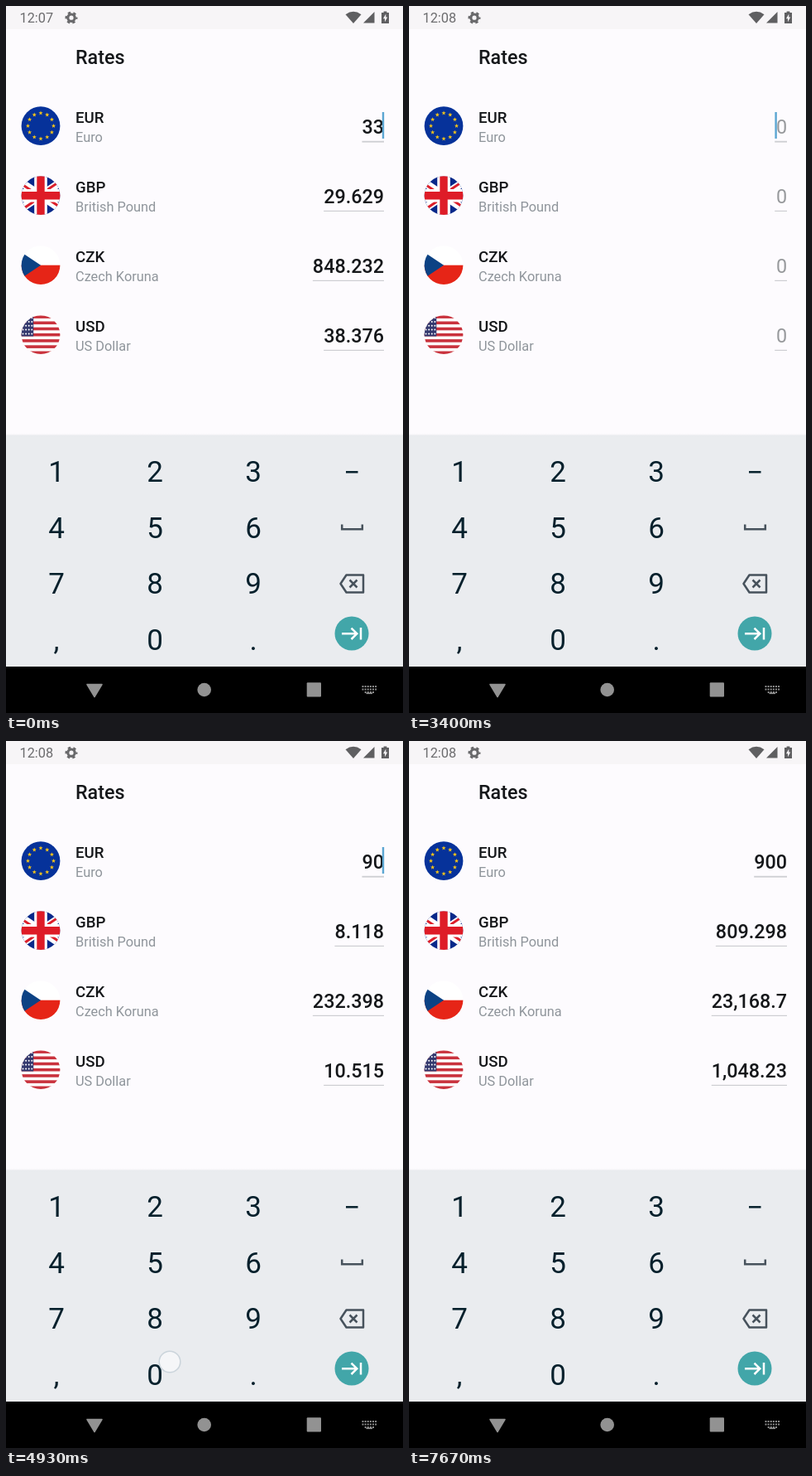
These frames come from a looping animation (480x853 px, 8 s). An HTML page:

```html
<!DOCTYPE html>
<html lang="en">
<head>
<meta charset="utf-8">
<title>Rates</title>
<style>
  html, body { margin: 0; width: 100%; height: 100%; overflow: hidden; background: #fdfbfe; }
  svg { display: block; width: 100vw; height: 100vh; font-family: Roboto, sans-serif; }
  .title { font-size: 23.35px; font-weight: 500; fill: #15171a; }
  .code { font-size: 18.68px; font-weight: 500; fill: #15171a; }
  .name { font-size: 16.34px; fill: #8f959b; }
  .value { font-size: 23.35px; font-weight: 500; fill: #15171a; text-anchor: end; }
  .value.hint { fill: #97999c; font-weight: 400; }
  .key { font-size: 35px; fill: #06202c; text-anchor: middle; }
</style>
</head>
<body>
<svg viewBox="0 0 480 853" preserveAspectRatio="none">
  <defs>
    <clipPath id="disc"><circle r="23.4"/></clipPath>
    <linearGradient id="shade" x2="0" y2="1">
      <stop stop-color="#fdfbfe"/><stop offset="1" stop-color="#e6e8eb"/>
    </linearGradient>
  </defs>
  <rect width="480" height="853" fill="#fdfbfe"/>

  <!-- status bar -->
  <rect width="480" height="28" fill="#f7f5f7"/>
  <text id="clock" x="16.500" y="20.300" font-size="16.340" fill="#6c6c6e"></text>
  <g transform="translate(79 14.200)" fill="none" stroke="#69696b">
    <circle r="4.200" stroke-width="3.200"/>
    <circle r="6.300" stroke-width="2.400" stroke-dasharray="3.300" stroke-dashoffset="1.650"/>
  </g>
  <g fill="#5f5f61">
    <path d="M410.500 10.200Q420 3.400 429.500 10.200L420 21Z"/>
    <path d="M445.500 7V20.500H432Z"/>
    <path d="M456.600 8V6.500H460.400V8H463V21H454V8Z"/>
  </g>
  <path d="M459.300 9.500L456 15.300H458V19.300L461.200 13.500H459.300Z" fill="#f7f5f7"/>

  <text class="title" x="84" y="70.200">Rates</text>
  <g id="rows"></g>
  <rect id="cursor" y="128" width="2.400" height="32" fill="#5ba6d2"/>

  <!-- keyboard -->
  <rect y="516" width="480" height="3" fill="url(#shade)"/>
  <rect y="518.500" width="480" height="279" fill="#eaecef"/>
  <rect id="press" width="118" height="66" fill="#d9dce0"/>
  <g id="keys"></g>
  <g fill="none" stroke="#47525c" stroke-width="2.500">
    <path d="M411 562.300H425.500" stroke="#06202c"/>
    <path d="M406.200 625.500V631.300H430.800V625.500"/>
    <path d="M411.500 686.500H432V707.500H411.500L404.500 697Z" stroke-linejoin="round"/>
    <path d="M415.500 692.500L424.500 701.500M424.500 692.500L415.500 701.500"/>
  </g>
  <circle cx="418" cy="757" r="20.500" fill="#42a6a9"/>
  <path d="M406 757.300H424M417.500 750.600L424.300 757.300L417.500 764M429 750V764.600" fill="none" stroke="#fff" stroke-width="2.500"/>
  <circle id="touch" r="12.800" fill="#f8f9fb" fill-opacity=".75" stroke="#cbd4db" stroke-width="1.600"/>

  <!-- navigation bar -->
  <rect y="797" width="480" height="56" fill="#000"/>
  <g fill="#929292">
    <path d="M98 818.500H116L107 833.500Z" stroke="#929292" stroke-width="1.500" stroke-linejoin="round"/>
    <circle cx="239.700" cy="825" r="8.300"/>
    <rect x="363.700" y="816.300" width="17.300" height="17.300" rx="1"/>
  </g>
  <path d="M430.500 821H448M430.500 824.500H448M433.700 828H446" stroke="#929292" stroke-width="1.900" stroke-dasharray="1.900 1.230"/>
  <path d="M435.500 829.300H443" stroke="#929292" stroke-width="1.600"/>
</svg>
<script>
const $ = id => document.getElementById(id);
const range = (n, f) => Array.from({ length: n }, (_, i) => f(i)).join('');
const rect = (x, y, w, h, fill) => `<rect x="${x}" y="${y}" width="${w}" height="${h}" fill="${fill}"/>`;
const path = (d, color, width) => `<path d="${d}" stroke="${color}" stroke-width="${width}" fill="none"/>`;

function star(x, y, r) {
  const pts = [...Array(10).keys()].map(i => {
    const a = i * Math.PI / 5, d = i % 2 ? r * 0.42 : r;
    return `${x + d * Math.sin(a)},${y - d * Math.cos(a)}`;
  });
  return `<polygon points="${pts.join(' ')}" fill="#f6c518"/>`;
}

// Flags are centred on 0,0 and clipped to a disc
const flags = [
  rect(-24, -24, 48, 48, '#06329a') +
    range(12, i => star(15.5 * Math.sin(i * Math.PI / 6), -15.5 * Math.cos(i * Math.PI / 6), 2.7)),
  rect(-24, -24, 48, 48, '#08288a') +
    path('M-35 -23.4L35 23.4M-35 23.4L35 -23.4', '#fff', 9.4) +
    path('M-35 -21.8L0 1.6M35 21.8L0 -1.6M-35 25L0 1.6M35 -25L0 -1.6', '#dc1f2b', 3) +
    path('M0 -24V24M-24 0H24', '#fff', 15.6) +
    path('M0 -24V24M-24 0H24', '#de1c27', 9.4),
  rect(-24, -24, 48, 24, '#fff') + rect(-24, 0, 48, 24, '#e62517') +
    '<path d="M-35 -23.4L0 0L-35 23.4Z" fill="#0c4284"/>',
  rect(-24, -24, 48, 48, '#fff') +
    range(7, i => rect(-24, -23.4 + i * 7.2, 48, 3.6, '#c9323d')) +
    rect(-24, -23.4, 15.2, 25.2, '#34396f') +
    range(20, i => `<circle cx="${-21.5 + i % 4 * 3.6}" cy="${-20.5 + (i >> 2) * 4.8}" r="1" fill="#fff"/>`)
];

const names = [['EUR', 'Euro'], ['GBP', 'British Pound'], ['CZK', 'Czech Koruna'], ['USD', 'US Dollar']];
$('rows').innerHTML = names.map(([code, name], i) => `<g transform="translate(0 ${i * 84})">
  <g transform="translate(42 144.7)" clip-path="url(#disc)">${flags[i]}</g>
  <text class="code" x="84" y="140.5">${code}</text>
  <text class="name" x="84" y="163.7">${name}</text>
  <text class="value" x="457" y="153.6"></text>
  <rect class="line" y="162.800" height="${i ? 1.2 : 1.8}" fill="#cdced2"/></g>`).join('');
const values = [...document.querySelectorAll('.value')];
const lines = [...document.querySelectorAll('.line')];

const keys = ['123', '456', '789', ',0.'];
$('keys').innerHTML = keys.map((row, r) => range(3, c =>
  `<text class="key" x="${61 + c * 119}" y="${574.4 + r * 67.5}">${row[c]}</text>`)).join('');

// Each track is a list of [start time, value]
const typed = [[0, '33'], [1930, '3'], [2400, ''], [4400, '9'], [4930, '90'], [5200, '900']];
const amount = [[0, 33], [1930, 3], [2530, 0], [4530, 9], [5070, 90], [5330, 900]];
const rates = [
  [0, [0.89785, 25.704, 1.16291]],
  [2070, [0.9005, 25.82, 1.1682]],
  [2530, [0.90199, 25.822, 1.1683]],
  [5400, [0.90239, 25.834, 1.1688]],
  [7130, [0.89922, 25.743, 1.1647]]
];
const blinks = [270, 730, 1200, 1730, 2870, 3400, 3930, 4400, 5670, 6200, 6670, 7200, 7670];
const taps = [
  { start: 4270, x: 315, y: 688, keyX: 240, keyY: 663 },
  { start: 4800, x: 198, y: 749, keyX: 121, keyY: 730.5 },
  { start: 5070, x: 198, y: 749, keyX: 121, keyY: 730.5 }
];

const at = (track, t) => track.filter(([start]) => start <= t).pop()[1];
const format = n => n.toLocaleString('en-US', { maximumFractionDigits: n < 1e3 ? 3 : n < 1e4 ? 2 : 1 });

function set(el, attrs) {
  for (const k in attrs) el.setAttribute(k, attrs[k]);
}

function setValue(i, text) {
  const el = values[i], hint = !text;
  if (el.textContent !== (text || '0')) el.textContent = text || '0';
  el.classList.toggle('hint', hint);
  const w = Math.max(14.8, el.getComputedTextLength());
  set(lines[i], { x: 457 - w, width: w });
}

function draw(t) {
  $('clock').textContent = t < 1470 ? '12:07' : '12:08';

  const entry = at(typed, t), base = at(amount, t);
  setValue(0, entry);
  at(rates, t).forEach((rate, i) => setValue(i + 1, base ? format(base * rate) : ''));

  const lit = blinks.filter(b => b <= t).length % 2 === 0;
  set($('cursor'), { x: entry ? 454.8 : 442.4, visibility: lit ? 'visible' : 'hidden' });

  const tap = taps.find(p => t >= p.start && t < p.start + 200);
  const age = tap ? t - tap.start : -1;
  set($('touch'), { cx: tap ? tap.x : 0, cy: tap ? tap.y : 0, visibility: tap ? 'visible' : 'hidden' });
  set($('press'), {
    x: tap ? tap.keyX : 0, y: tap ? tap.keyY : 0,
    visibility: age >= 60 && age < 130 ? 'visible' : 'hidden'
  });
}

function frame() {
  draw(performance.now() % 8000);
  requestAnimationFrame(frame);
}
frame();
</script>
</body>
</html>
```
